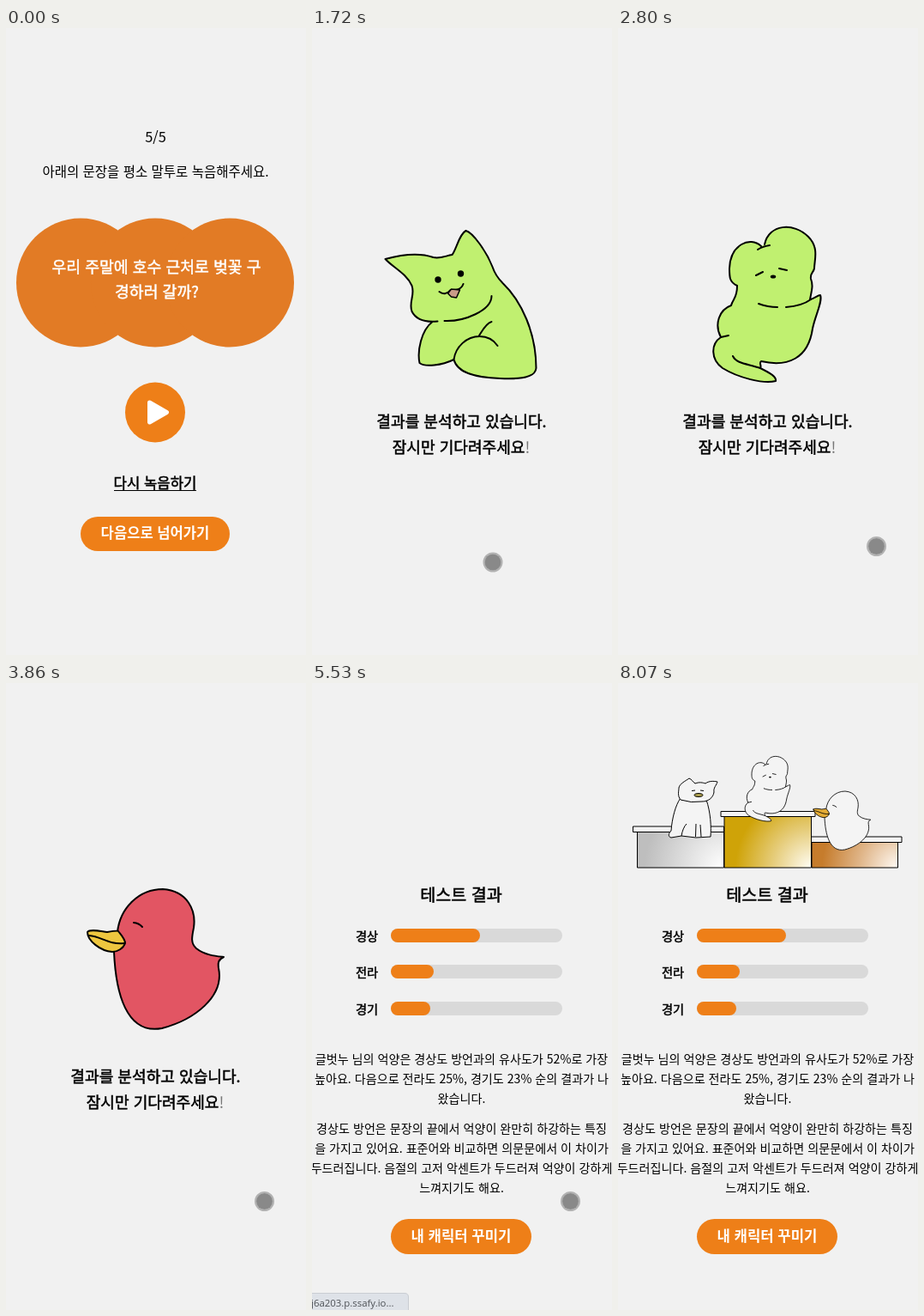
These frames come from a looping animation (350 by 730 pixels, 8400 ms). An HTML page:

```html
<!DOCTYPE html>
<html lang="ko">
<head>
<meta charset="utf-8">
<title>억양 테스트</title>
<style>
html, body { margin: 0; width: 100%; height: 100%; overflow: hidden; background: #f1f1f1; }
svg { display: block; width: 100%; height: 100%; }
text { font-family: "Noto Sans CJK KR", "Noto Sans CJK", "Noto Sans", sans-serif; white-space: pre; }
.ink { fill: none; stroke: #000; stroke-width: 2; stroke-linecap: round; stroke-linejoin: round; }
.fine { stroke: #000; stroke-width: 1; stroke-linejoin: round; }
</style>
</head>
<body>
<svg viewBox="0 0 350 730">
  <defs>
    <radialGradient id="silver" gradientUnits="userSpaceOnUse" cx="123" cy="215" r="92"><stop offset="0" stop-color="#fff"/><stop offset="1" stop-color="#bebebe"/></radialGradient>
    <radialGradient id="gold" gradientUnits="userSpaceOnUse" cx="225" cy="215" r="88"><stop offset="0" stop-color="#fffdf4"/><stop offset=".5" stop-color="#e6cd7c"/><stop offset="1" stop-color="#cfa308"/></radialGradient>
    <radialGradient id="bronze" gradientUnits="userSpaceOnUse" cx="326" cy="215" r="88"><stop offset="0" stop-color="#fffaf4"/><stop offset=".5" stop-color="#e0b68a"/><stop offset="1" stop-color="#c67c2c"/></radialGradient>

    <g id="cat">
      <path fill="#c0f070" d="M61 342C48 352 43 376 46 390C52 395 72 393 86 386C90 402 112 407 140 408C164 409 181 407 182 396C182 355 165 318 143 297C136 290 133 284 131 278C124 260 108 238 100 236C92 240 89 258 84 264C77 265 70 269 62 267C45 261 24 264 6 269C14 278 31 286 37 300C41 311 33 319 37 330C41 339 51 342 61 342Z"/>
      <path class="ink" d="M67 341.500C51 343 41 338 37 330C33 319 41 311 37 300C31 286 14 278 6 269C24 264 45 261 62 267C70 269 77 265 84 264C89 258 92 240 100 236C108 238 124 260 131 278C133 284 136 290 143 297C165 318 182 355 182 396C181 407 164 409 140 408C112 407 90 402 86 386C88 371 101 359 116 359C126 359 133 364 137 370M61 342C48 352 43 376 46 390C52 395 72 393 86 386M75 341C98 342 130 329 130 312M130 342C123 344 119 353 115 359M69 307C74 311 79 309 82 305C87 305 94 306 97 298"/>
      <path class="ink" style="fill:#c99b88;stroke-width:1.500" d="M79 309L83 304L93 305L89 314L83 313Z"/>
      <circle cx="67.500" cy="293" r="3.700"/><circle cx="94" cy="286" r="3.700"/>
    </g>
    <g id="bear">
      <path class="ink" style="fill:var(--skin)" d="M171 252C176 228 205 226 222 243C235 256 229 270 229 280C228 285 224 285 225 292C228 300 226 305 224 316C229 315 233 311 236 311C239 318 230 335 227 350C222 385 198 395 167 388C164 390 168 393 166 396C178 402 185 406 184 411C170 415 140 407 122 396C108 386 108 368 120 360C112 345 118 328 132 323C134 315 139 315 139 300C130 296 130 290 130 280C131 252 154 242 167 254"/>
      <path class="ink" d="M163 258Q169 254 177 253M120 360L129 358M134 382C138 391 152 391 166 396M164 321C172 324 178 325 186 325M196 325C208 324 217 322 225 316M161 288L169 284M188 280L197 282"/>
      <ellipse cx="181" cy="289.500" rx="3.200" ry="2"/>
    </g>
    <g id="duck">
      <path class="ink" style="fill:var(--skin)" d="M130 290C133 262 155 240 183 240C212 242 222 265 219 285C217 295 215 303 222 309C232 317 245 318 254 319C248 322 247 325 248 332C255 365 220 392 182 402C140 410 128 360 126 313Z"/>
      <path class="ink" style="fill:var(--bill)" d="M95 290C98 286 110 289 118 290C124 289 130 288 131 289C134 293 139 298 139 303C137 309 130 313 124 313C110 312 95 300 95 290Z"/>
      <path class="ink" d="M97 294C111 295 120 305 138 303M149 279Q155 279.500 159 284"/>
    </g>
  </defs>

  <rect width="350" height="730" fill="#f1f1f1"/>

  <g id="record">
    <g fill="#e27b25"><circle cx="87" cy="296.500" r="75"/><circle cx="174" cy="296.500" r="75"/><circle cx="261" cy="296.500" r="75"/></g>
    <circle cx="174" cy="447.500" r="35" fill="#ee7f18"/>
    <path d="M167.500 436L187.500 447.500L167.500 459Z" fill="#fff" stroke="#fff" stroke-width="5" stroke-linejoin="round"/>
    <rect id="next" x="87" y="569" width="174" height="40" rx="20"/>
    <path d="M126 538.500H222" stroke="#000" stroke-width="1.200"/>
  </g>

  <g id="loading">
    <g id="slides" style="--bill:#eec63f">
      <use href="#cat" x="79.500"/>
      <use href="#bear" x="350" style="--skin:#c0f070"/>
      <use href="#duck" x="700" style="--skin:#e25563"/>
      <use href="#duck" x="1050" style="--skin:#e25563"/>
    </g>
  </g>

  <g id="result">
    <g id="podium" style="--skin:#f4f4f4;--bill:#e2ab35">
      <g class="fine">
        <rect x="22.500" y="173" width="101" height="42" fill="url(#silver)"/>
        <rect x="226" y="185" width="100.500" height="30" fill="url(#bronze)"/>
        <rect x="124" y="155" width="101.500" height="60" fill="url(#gold)"/>
        <rect x="17.500" y="167" width="106" height="6.500" fill="#f4f4f4"/>
        <rect x="225.500" y="179" width="105.500" height="6.500" fill="#f4f4f4"/>
        <rect x="120" y="149.500" width="110" height="6" fill="#f4f4f4"/>
        <path fill="#f4f4f4" d="M73 134C67 142 63 158 62 172C59 175 58 179 62 180L74 178L91 180L108 179C109 168 108 150 103 136Z"/>
        <path fill="#f4f4f4" d="M73 136C69 131 71 126 71 122C72 117 79 114 83 111C86 112 87 115 90 117C95 115 99 116 102 117C106 114 111 114 116 115C115 119 111 122 112 127C111 134 105 138 98 138Q85 140 73 136Z"/>
        <path fill="none" d="M74 178C75 172 77 167 80 164M90.500 179L91 164M97 179L96 165M86 125.500L90 125M96 125L100 125.500"/>
        <ellipse cx="94" cy="130.500" rx="5" ry="2" fill="#b3a552"/>
      </g>
      <use href="#bear" transform="translate(101.400 -12) scale(.42)"/>
      <use href="#duck" transform="translate(188.100 25.200) scale(.42)"/>
    </g>
    <g id="bars"></g>
    <rect x="92" y="624" width="164" height="41" rx="20.500" fill="#ee7f18"/>
    <g id="status">
      <path d="M-2 710.500H108Q112.500 710.500 112.500 715V732H-2Z" fill="#dee2e8" stroke="#c9cdd3"/>
      <text x="-1" y="725.500" fill="#4d5156" style="font:11.400px 'Open Sans',sans-serif">j6a203.p.ssafy.io...</text>
    </g>
  </g>

  <g id="cursor">
    <circle r="10.500" fill="none" stroke="#000" stroke-opacity=".26" stroke-width="2"/>
    <circle id="dot" r="9.500"/>
  </g>
</svg>
<script>
const $ = id => document.getElementById(id);
const LOOP = 8400, ORANGE = '#ee7f18';

function add(parent, tag, attrs) {
  const el = document.createElementNS('http://www.w3.org/2000/svg', tag);
  for (const k in attrs) el.setAttribute(k, attrs[k]);
  return parent.appendChild(el);
}

// Text centred on (x, y); a thin outline stands in for the medium weight
function label(parent, str, x, y, size, weight = 400, fill = '#000') {
  const el = add(parent, 'text', {
    x, y: y + size * 0.375, fill, 'font-size': size, 'font-weight': weight, 'text-anchor': 'middle',
    stroke: fill, 'stroke-width': weight === 500 ? 0.5 : 0
  });
  el.textContent = str;
  return el;
}

const rec = $('record'), load = $('loading'), res = $('result');
label(rec, '5/5', 174.5, 126.5, 16.4);
label(rec, '아래의 문장을 평소 말투로 녹음해주세요.', 174.5, 167, 15.5);
label(rec, '우리 주말에 호수 근처로 벚꽃 구', 175.5, 278, 18.3, 500, '#fff');
label(rec, '경하러 갈까?', 176, 307, 18.3, 500, '#fff');
label(rec, '다시 녹음하기', 174, 530, 16.7, 500);
label(rec, '다음으로 넘어가기', 174, 588, 16.6, 700, '#fff');

label(load, '결과를 분석하고 있습니다.', 174.5, 458.5, 18.1, 500);
const wait = label(load, '잠시만 기다려주세요', 174, 488.5, 18.1, 500);
add(wait, 'tspan', { fill: '#777', 'font-weight': 300, stroke: 'none' }).textContent = '!';

label(res, '테스트 결과', 174, 247, 19.6, 500);
[['경상', 52, 286], ['전라', 25, 328], ['경기', 23, 371]].forEach(([name, pct, y]) => {
  const bar = { x: 92, y, height: 16, rx: 8 };
  add($('bars'), 'rect', { ...bar, width: 200, fill: '#d9d9d9' });
  add($('bars'), 'rect', { ...bar, width: pct * 2, fill: ORANGE });
  label(res, name, 64, y + 8.5, 14.2, 500);
});
[
  ['글벗누 님의 억양은 경상도 방언과의 유사도가 52%로 가장', 437.5],
  ['높아요. 다음으로 전라도 25%, 경기도 23% 순의 결과가 나', 460.5],
  ['왔습니다.', 484],
  ['경상도 방언은 문장의 끝에서 억양이 완만히 하강하는 특징', 519],
  ['을 가지고 있어요. 표준어와 비교하면 의문문에서 이 차이가', 542],
  ['두드러집니다. 음절의 고저 악센트가 두드러져 억양이 강하게', 565],
  ['느껴지기도 해요.', 588]
].forEach(([str, y]) => label(res, str, 174.5, y, 14.1));
label(res, '내 캐릭터 꾸미기', 174, 643.5, 16.7, 700, '#fff');

// Number of screen refreshes seen since a, out of n spread over a..b
function ticks(t, a, b, n) {
  return t < a ? 0 : Math.min(n, Math.floor((t - a) / (b - a) * (n - 1) + 1e-6) + 1);
}

// cubic-bezier(.25, .1, .25, 1)
function ease(x) {
  let lo = 0, hi = 1;
  for (let i = 0; i < 24; i++) {
    const s = (lo + hi) / 2;
    if (0.75 * s - 0.75 * s * s + s ** 3 < x) lo = s; else hi = s;
  }
  return 0.3 * lo * (1 - lo) ** 2 + 3 * (1 - lo) * lo * lo + lo ** 3;
}

// start, end, refreshes, progress at the first refresh
const SLIDES = [[2510, 2800, 5, 0.171], [3590, 3860, 5, 0.116], [4740, 5020, 5, 0.15]];

function slideShift(t) {
  return SLIDES.reduce((sum, [a, b, n, p0]) => {
    const k = ticks(t, a, b, n);
    return sum + (k ? 350 * ease(p0 + (1 - p0) * (k - 1) / (n - 1)) : 0);
  }, 0);
}

// start, end, refreshes, control point, end point
const MOVES = [
  [130, 790, 11, 210, 650, 170.5, 585.5],
  [1520, 1720, 4, 188, 610, 211, 622],
  [1920, 2240, 6, 250, 624, 301.5, 603.5],
  [5860, 6330, 8, 292, 530, 256, 489],
  [7320, 7460, 3, 258, 512, 267, 535.5],
  [7660, 8070, 7, 240, 566, 276, 613]
];

function cursorAt(t) {
  let x = 346, y = 745;
  for (const [a, b, n, cx, cy, ex, ey] of MOVES) {
    if (t < a) break;
    const p = ticks(t, a, b, n) / n, q = 1 - p;
    x = q * q * x + 2 * q * p * cx + p * p * ex;
    y = q * q * y + 2 * q * p * cy + p * p * ey;
  }
  return [x, y];
}

function show(el, on) { el.style.display = on ? '' : 'none'; }

function draw(t) {
  show(rec, t < 1520);
  show(load, t >= 1520 && t < 5530);
  show(res, t >= 5530);
  show($('podium'), t >= 5600);
  show($('status'), t < 6000);
  show($('cursor'), t >= 130 && t < 8070);

  const h = ticks(t, 980, 1120, 3) / 3;
  $('next').setAttribute('fill', `rgb(${238 + 8 * h},${127 + 47 * h},${24 + 45 * h})`);
  $('slides').setAttribute('transform', `translate(${-slideShift(t)} 0)`);
  $('cursor').setAttribute('transform', `translate(${cursorAt(t)})`);
  $('dot').setAttribute('fill-opacity', t >= 980 && t < 1520 ? 0.5 : 0.43);
}

const begin = performance.now();
function frame() {
  draw((performance.now() - begin) % LOOP);
  requestAnimationFrame(frame);
}
draw(0);
requestAnimationFrame(frame);
</script>
</body>
</html>
```
